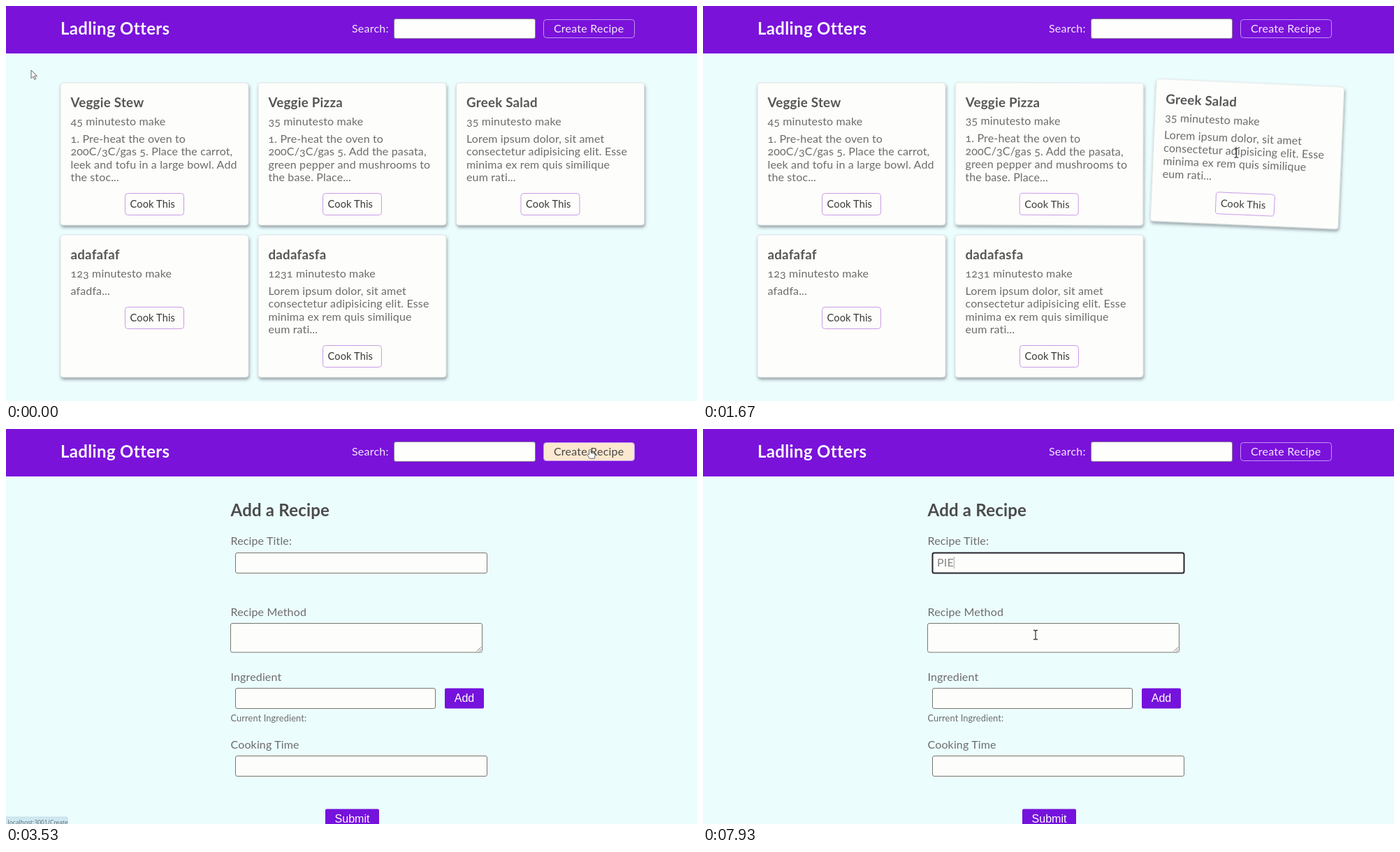
Write an HTML page that moves like this. It is 989 px wide and 566 px high and loops after 8 s.

```html
<!DOCTYPE html>
<html lang="en">
<head>
<meta charset="utf-8">
<title>Recipe site</title>
<style>
  html, body { margin: 0; width: 100%; height: 100%; overflow: hidden; background: #ecfdfe; }
  svg { display: block; }
  text { font: 16px Lato, sans-serif; letter-spacing: .009em;
         font-variant-numeric: oldstyle-nums; fill: #6c6c6c; white-space: pre; }
  .light { fill: #f3e8fd; letter-spacing: .014em; }
  .brand { font-size: 24px; font-weight: 700; fill: #fbf6ff; letter-spacing: .014em; }
  .heading { font-size: 24px; font-weight: 700; fill: #4b4b4b; }
  .title { font-size: 18.7px; font-weight: 700; fill: #565656; letter-spacing: .014em; }
  .cook { font-size: 14.6px; fill: #3a3a3a; }
  .small { font-size: 12.8px; }
  .value { fill: #858585; }
  .arial { font-family: "Liberation Sans", Arial, sans-serif; fill: #fff; text-anchor: middle;
           letter-spacing: 0; }
  .status { font: 8.5px "Open Sans", sans-serif; letter-spacing: 0; fill: #5b6670; }
  .card { fill: #fdfdfb; stroke: #d5dcdc; stroke-width: .7; filter: url(#shadow); }
  .outline { fill: #fdfdfb; stroke: #c99be8; }
  .field { fill: #fdfdfb; stroke: #77776f; }
  .purple { fill: #7512dc; }
</style>
</head>
<body>
<svg id="stage" width="989" height="566" viewBox="0 0 989 566">
  <defs>
    <filter id="shadow" x="-10%" y="-10%" width="120%" height="125%">
      <feDropShadow dx="1" dy="3" stdDeviation="2.2" flood-color="#3a4048" flood-opacity=".5"/>
    </filter>
  </defs>

  <rect width="989" height="566" fill="#ecfdfe"/>
  <rect width="989" height="68" fill="#7a12da"/>
  <text class="brand" x="78" y="41">Ladling Otters</text>
  <text class="light" x="495" y="38">Search:</text>
  <rect x="555.5" y="18.5" width="202" height="28" rx="2.5" fill="#fefefd" stroke="#8a7f93"/>
  <rect id="createBox" x="769.5" y="19.5" width="130" height="26" rx="4" stroke="#c296f4"/>
  <text id="createText" class="light" x="784" y="38">Create Recipe</text>

  <g id="home"></g>

  <g id="form">
    <text class="heading" x="321.5" y="125">Add a Recipe</text>
    <text x="321.5" y="166">Recipe Title:</text>
    <rect id="titleField" class="field" x="328.5" y="177.5" width="360" height="29" rx="2.5"/>
    <text id="value" class="value" x="335" y="196.5"></text>
    <rect id="caret" y="183" width="1" height="17" fill="#a5a59b"/>
    <text x="321.5" y="267.5">Recipe Method</text>
    <rect class="field" x="321.5" y="278.5" width="360" height="41.5" rx="2.5"/>
    <path d="M674 318.5l6-6m-2.5 6l2.5-2.5" stroke="#777"/>
    <text x="321.5" y="360.5">Ingredient</text>
    <rect class="field" x="328.5" y="371.5" width="286" height="29" rx="2.5"/>
    <rect class="purple" x="628" y="371.5" width="56" height="29" rx="2"/>
    <text class="arial" x="656" y="391">Add</text>
    <text class="small" x="321.5" y="419">Current Ingredient:</text>
    <text x="321.5" y="458">Cooking Time</text>
    <rect class="field" x="328.5" y="468.5" width="360" height="29" rx="2.5"/>
    <rect class="purple" x="457" y="544.5" width="77" height="30" rx="2"/>
    <text class="arial" x="495.5" y="564">Submit</text>
  </g>

  <g id="status">
    <path d="M0 556h86q2 0 2 2v8H0z" fill="#cfe9f3" stroke="#b4cdd8" stroke-width=".6"/>
    <text class="status" x="2.5" y="566.5">localhost:3001/Create</text>
  </g>

  <g id="pointer">
    <path id="arrow" d="M0 0v11.5l2.8-2.5 2 4.3 1.9-.9-2-4.1h3.7z" fill="#fff" stroke="#555" stroke-width=".9"/>
    <path id="beam" d="M-3-6.5h2l1 1 1-1h2M0-5.5V5.5M-3 6.5h2l1-1 1 1h2" fill="none" stroke="#3d3d45" stroke-width="1.3"/>
    <path id="hand" d="M-1.5 0q1.5-2 2.5 0v4l5 1.2q1.5.5 1.2 2l-.8 5H-.5l-4-5.5q.5-1.700 3 .2z" fill="#fff" stroke="#555" stroke-width=".9"/>
  </g>
</svg>
<script>
const LOOP = 8000, STEP = 1000 / 15, PAGE_CHANGE = 3530, FOCUS = 4400;
const TURN = 3, TURN_TIME = 400, CARD_W = 269, CARD_H = 204;
const $ = id => document.getElementById(id);
const show = (id, on) => $(id).setAttribute('display', on ? 'inline' : 'none');

const lorem = ['Lorem ipsum dolor, sit amet', 'consectetur adipisicing elit. Esse',
  'minima ex rem quis similique', 'eum rati...'];
// hovers: [enter, leave] times in ms
const cards = [
  { x: 78, y: 110, title: 'Veggie Stew', time: 45, hovers: [[550, 960]],
    lines: ['1. Pre-heat the oven to', '200C/3C/gas 5. Place the carrot,', 'leek and tofu in a large bowl. Add', 'the stoc...'] },
  { x: 361, y: 110, title: 'Veggie Pizza', time: 35, hovers: [[970, 1400], [2680, 3000]],
    lines: ['1. Pre-heat the oven to', '200C/3C/gas 5. Add the pasata,', 'green pepper and mushrooms to', 'the base. Place...'] },
  { x: 644.5, y: 110, title: 'Greek Salad', time: 35, hovers: [[1450, 1910]], lines: lorem },
  { x: 78, y: 328, title: 'adafafaf', time: 123, hovers: [[2432, 2590]], lines: ['afadfa...'] },
  { x: 361, y: 328, title: 'dadafasfa', time: 1231, hovers: [[1985, 2370]], lines: lorem },
];

// pointer path: time, x, y
const path = [
  [0, 36, 92], [300, 32, 130], [550, 78, 190], [800, 230, 215], [960, 347, 205], [1130, 474, 187],
  [1400, 630, 185], [1650, 765, 205], [1800, 750, 255], [1910, 690, 315], [1985, 605, 330],
  [2070, 495, 435], [2200, 440, 445], [2370, 361, 432], [2432, 346, 420], [2520, 322, 372],
  [2600, 337, 325], [2680, 370, 312], [2850, 500, 200], [3000, 600, 109], [3150, 700, 58],
  [3300, 828, 36], [3530, 836, 30], [3700, 836, 31], [4000, 690, 110], [4300, 497, 186],
  [6600, 497, 186], [7300, 476, 295], [8000, 476, 295],
];
const typing = [[4930, 'P'], [5270, 'PI'], [5600, 'PIE']];

$('home').innerHTML = cards.map(({ x, y, title, time, lines }) => {
  const buttonY = 84 + 18.6 * lines.length;
  return `<g><rect class="card" x="${x}" y="${y}" width="${CARD_W}" height="${CARD_H}" rx="4"/>
    <g transform="translate(${x} ${y})">
      <text class="title" x="14.5" y="35">${title}</text>
      <text x="14.5" y="60.5">${time} minutesto make</text>
      ${lines.map((line, i) => `<text x="14.5" y="${85.5 + 18.6 * i}">${line}</text>`).join('')}
      <rect class="outline" x="92.5" y="${Math.round(buttonY) + .5}" width="84" height="31" rx="4"/>
      <text class="cook" x="99.5" y="${buttonY + 21}">Cook This</text>
    </g></g>`;
}).join('');
const cardNodes = [...$('home').children];

// CSS "ease": cubic-bezier(.25, .1, .25, 1)
function ease(x) {
  if (x <= 0) return 0;
  if (x >= 1) return 1;
  const bezier = (s, a, b) => 3 * s * (1 - s) ** 2 * a + 3 * s * s * (1 - s) * b + s ** 3;
  let low = 0, high = 1;
  for (let i = 0; i < 20; i++) {
    const mid = (low + high) / 2;
    if (bezier(mid, .25, .25) < x) low = mid; else high = mid;
  }
  return bezier(low, .1, 1);
}

function hoverAmount(t, [enter, leave]) {
  const rise = ease((Math.min(t, leave) - enter) / TURN_TIME);
  return rise * (1 - ease((t - leave) / TURN_TIME));
}

function pointerAt(t) {
  const i = Math.max(1, path.findIndex(key => key[0] >= t));
  const [t0, x0, y0] = path[i - 1], [t1, x1, y1] = path[i];
  const k = (t - t0) / (t1 - t0);
  return [x0 + (x1 - x0) * k, y0 + (y1 - y0) * k];
}

const inside = (x, y, left, top, width, height) =>
  x > left && x < left + width && y > top && y < top + height;

function draw(t) {
  const onForm = t >= PAGE_CHANGE - 5;
  show('home', !onForm);
  show('form', onForm);

  cards.forEach(({ x, y, hovers }, i) => {
    const angle = TURN * Math.max(...hovers.map(h => hoverAmount(t, h)));
    cardNodes[i].setAttribute('transform', `rotate(${angle} ${x + CARD_W / 2} ${y + CARD_H / 2})`);
  });

  const [px, py] = pointerAt(t);
  const onCreate = inside(px, py, 769, 19, 131, 27);
  const onText = onForm
    ? inside(px, py, 328, 177, 361, 30) || inside(px, py, 321, 278, 361, 42)
    : cards.some(c => inside(px, py, c.x + 14, c.y + 20, CARD_W - 28, 125));
  $('pointer').setAttribute('transform', `translate(${px} ${py})`);
  show('hand', onCreate);
  show('beam', onText);
  show('arrow', !onCreate && !onText);
  show('status', onCreate);
  $('createBox').setAttribute('fill', onCreate ? '#fbe8cf' : 'none');
  $('createText').setAttribute('style', onCreate ? 'fill: #4b4545' : '');

  const focused = t >= FOCUS;
  const [since, word] = typing.filter(([at]) => at <= t).pop() || [FOCUS, ''];
  $('titleField').setAttribute('style', focused ? 'stroke: #25252b; stroke-width: 2' : '');
  $('value').textContent = word;
  show('caret', focused && Math.floor((t - since) / 500) % 2 === 0);
  if (onForm) $('caret').setAttribute('x', 335 + (word ? $('value').getComputedTextLength() : 0));
}

function tick() {
  const t = performance.now() % LOOP;
  draw(Math.floor((t + 5) / STEP) * STEP % LOOP);
  requestAnimationFrame(tick);
}
tick();
</script>
</body>
</html>
```
